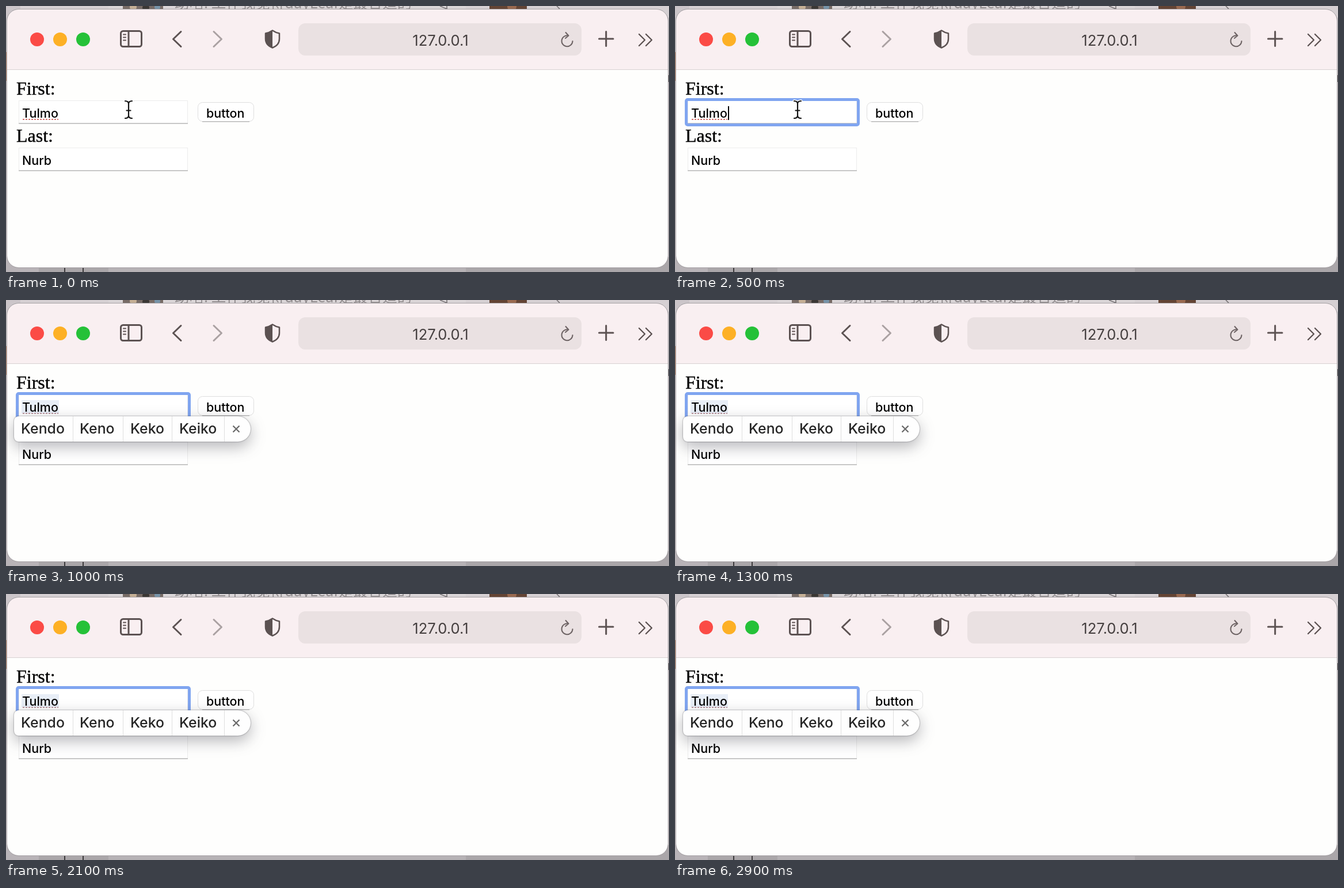
Animation of 1152 by 462 pixels, one loop 3 s. Source, as an HTML page:

```html
<!DOCTYPE html>
<html lang="en">
<head>
<meta charset="utf-8">
<title>Spelling suggestions</title>
<style>
  html, body { margin: 0; width: 100%; height: 100%; overflow: hidden; background: #c6c1c4; }
  svg { display: block; width: 1152px; height: 462px; }
  text { font-family: Inter, "Open Sans", sans-serif; fill: #161616; }
  .label { font: 32px "Liberation Serif", "Times New Roman", serif; fill: #000; stroke: #000; stroke-width: .4; }
  .field { font-size: 21.5px; font-weight: 500; fill: #000; }
  .choice { font-size: 24.8px; font-weight: 500; fill: #262626; }
  .address { font-size: 25.6px; fill: #453f3f; text-anchor: middle; }
  .chat { font: 25.5px "Noto Sans CJK SC", "Noto Sans CJK", sans-serif; fill: #918c8e; }
  .icon { fill: none; stroke: #5c5252; stroke-width: 3; stroke-linecap: round; stroke-linejoin: round; }
  .box { fill: #fff; stroke: #ececec; }
  .edge { stroke: #b8b8b8; stroke-width: 1.5; }
  .ring { fill: none; stroke: #80a5f0; stroke-width: 5; }
  .popup { filter: drop-shadow(0 0 1px rgba(50, 50, 55, .6)) drop-shadow(0 9px 13px rgba(50, 50, 60, .35)); }

  .anim { animation: 3s step-end infinite; }
  .ring-grow { animation-name: ring-grow; }
  .ring-rest { animation-name: ring-rest; }
  .suggest { animation-name: suggest; }
  .dots { animation-name: dots; }
  .caret { animation-name: caret; }
  .pointer { animation-name: pointer; }
  @keyframes ring-grow { 0%, 16.66% { opacity: 0 } 13.33% { opacity: .5 } 100% { opacity: 0 } }
  @keyframes ring-rest { 0% { opacity: 0 } 16.66%, 100% { opacity: 1 } }
  @keyframes suggest { 0% { opacity: 0 } 23.33%, 100% { opacity: 1 } }
  @keyframes dots { 0% { stroke: #d0615c } 23.33%, 100% { stroke: #b58a92 } }
  @keyframes caret {
    0%, 29.99%, 63.33%, 96.66%, 100% { opacity: 0 }
    13.33%, 46.66%, 79.99% { opacity: 1 }
  }
  @keyframes pointer { 0% { opacity: 1 } 33.33%, 100% { opacity: 0 } }
</style>
</head>
<body>
<svg viewBox="0 0 1152 462">
  <defs>
    <clipPath id="frame"><rect x="2" y="6" width="1148" height="448" rx="20"/></clipPath>
    <path id="beam" d="M207 165q6 0 6 5q0-5 6-5M213 169V190M207 195q6 0 6-5q0 5 6 5M209.500 181.500h7"/>
  </defs>

  <!-- desktop behind the window -->
  <rect width="1152" height="20" fill="#d6d0d3"/>
  <rect width="25" height="20" fill="#cbc5c9"/>
  <rect x="178" width="621" height="20" fill="#dad5d7"/>
  <rect x="203" width="70" height="8" fill="#776b66"/>
  <circle cx="221" cy="2" r="6" fill="#c4ae94"/>
  <circle cx="243" cy="3" r="6" fill="#3b3734"/>
  <circle cx="263" cy="2" r="5" fill="#7793a8"/>
  <rect x="840" width="65" height="8" fill="#644434"/>
  <circle cx="879" cy="1" r="8" fill="#99694f"/>
  <text class="chat" x="293" y="4">助啥: 工作我觉得dayLeaf是最合适的</text>
  <path d="M754 0l14 6M766 0v6M957 0l5 5" stroke="#716d6f" stroke-width="1.500" fill="none"/>
  <rect y="80" width="2" height="50" fill="#ae8068"/>
  <path d="M1151 120v12" stroke="#545154" stroke-width="2"/>
  <rect y="436" width="1152" height="26" fill="#aaa6a9"/>
  <rect y="436" width="57" height="26" fill="#b8b3b7"/>
  <rect x="178" y="436" width="621" height="26" fill="#b6b2b5"/>
  <path d="M102 454v8M134 454v8" stroke="#3b393b" stroke-width="2"/>

  <!-- window -->
  <g clip-path="url(#frame)">
    <rect width="1152" height="462" fill="#fefefd"/>
    <rect width="1152" height="110" fill="#f9eff1"/>
    <rect y="110" width="1152" height="1" fill="#d8d1d2"/>
  </g>
  <rect x="1.500" y="5.500" width="1149" height="449" rx="20.500" fill="none" stroke="#a5a1a4"/>

  <!-- toolbar -->
  <circle cx="54" cy="58" r="12" fill="#fb4b46"/>
  <circle cx="94" cy="58" r="12" fill="#fdb025"/>
  <circle cx="134" cy="58" r="12" fill="#25c138"/>
  <g class="icon">
    <rect x="199.500" y="43.500" width="36" height="27" rx="4"/>
    <path d="M213 44v26"/>
    <path d="M204 49.500h4M204 54.500h4M204 59.500h4" stroke-width="2"/>
    <path d="M304 44.500L290.500 57.500L304 70.500"/>
    <path d="M361 44.500L374.500 57.500L361 70.500" stroke="#aaa1a2"/>
    <path d="M463 42.500Q469 46.500 475 47.500V57Q475 68 463 72.500Q451 68 451 57V47.500Q457 46.500 463 42.500Z" stroke-width="2.500"/>
    <path d="M463 42.500Q457 46.500 451 47.500V57Q451 68 463 72.500Z" fill="#5c5252" stroke="none"/>
    <path d="M1030.500 57h24.500M1042.700 44.500v25"/>
    <path d="M1100 49l10 10l-10 10M1112 49l10 10l-10 10" stroke-width="2.300"/>
  </g>
  <rect x="508" y="30" width="492" height="56" rx="12" fill="#eae1e2"/>
  <text class="address" x="755" y="69">127.0.0.1</text>
  <path class="icon" d="M977 51.500A9.500 9.500 0 1 0 984.500 61M972.500 46l5 5.500l-5.500 4.500" style="stroke:#6d6364;stroke-width:2"/>

  <!-- form -->
  <text class="label" x="18" y="154">First:</text>
  <text class="label" x="18" y="236">Last:</text>
  <rect class="box" x="22.500" y="164.500" width="293" height="39"/>
  <path class="edge" d="M22 204h294"/>
  <rect class="box" x="22.500" y="246.500" width="293" height="39"/>
  <path class="edge" d="M22 286h294"/>
  <rect class="box" x="333.500" y="167.500" width="97" height="33" rx="8" style="stroke:#dedede"/>
  <path class="edge" d="M341 200.700h82"/>
  <text class="field" x="348" y="194">button</text>
  <text class="field" x="28" y="276">Nurb</text>

  <rect class="anim ring ring-grow" x="11.500" y="154.500" width="315" height="60" rx="7"/>
  <rect class="anim ring ring-rest" x="19.500" y="162.500" width="299" height="44" rx="2.500"/>
  <rect class="anim suggest" x="27" y="174" width="65" height="23" fill="#e8eef7"/>
  <text class="field" x="28" y="194">Tulmo</text>
  <path class="anim dots" d="M29 196.800h62" stroke-width="1.700" stroke-dasharray="3 2"/>

  <!-- suggestions -->
  <g class="anim suggest">
    <path class="popup" d="M22 202H403a22 22 0 0 1 0 44H22a8 8 0 0 1-8-8V210a8 8 0 0 1 8-8Z" fill="#fefefe"/>
    <path d="M116.500 202v44M203.500 202v44M288.500 202v44M379.500 202v44" stroke="#dedede"/>
    <text class="choice" y="232"><tspan x="26">Kendo</tspan><tspan x="128">Keno</tspan><tspan x="216">Keko</tspan><tspan x="301">Keiko</tspan></text>
    <path d="M394.500 218.500l11 11M405.500 218.500l-11 11" stroke="#6b6b6b" stroke-width="2.300"/>
  </g>

  <rect class="anim caret" x="92" y="174" width="2" height="24"/>
  <g class="anim pointer" fill="none" stroke-linecap="round">
    <use href="#beam" stroke="#fff" stroke-width="5"/>
    <use href="#beam" stroke="#111" stroke-width="2.200"/>
  </g>
</svg>
</body>
</html>
```
